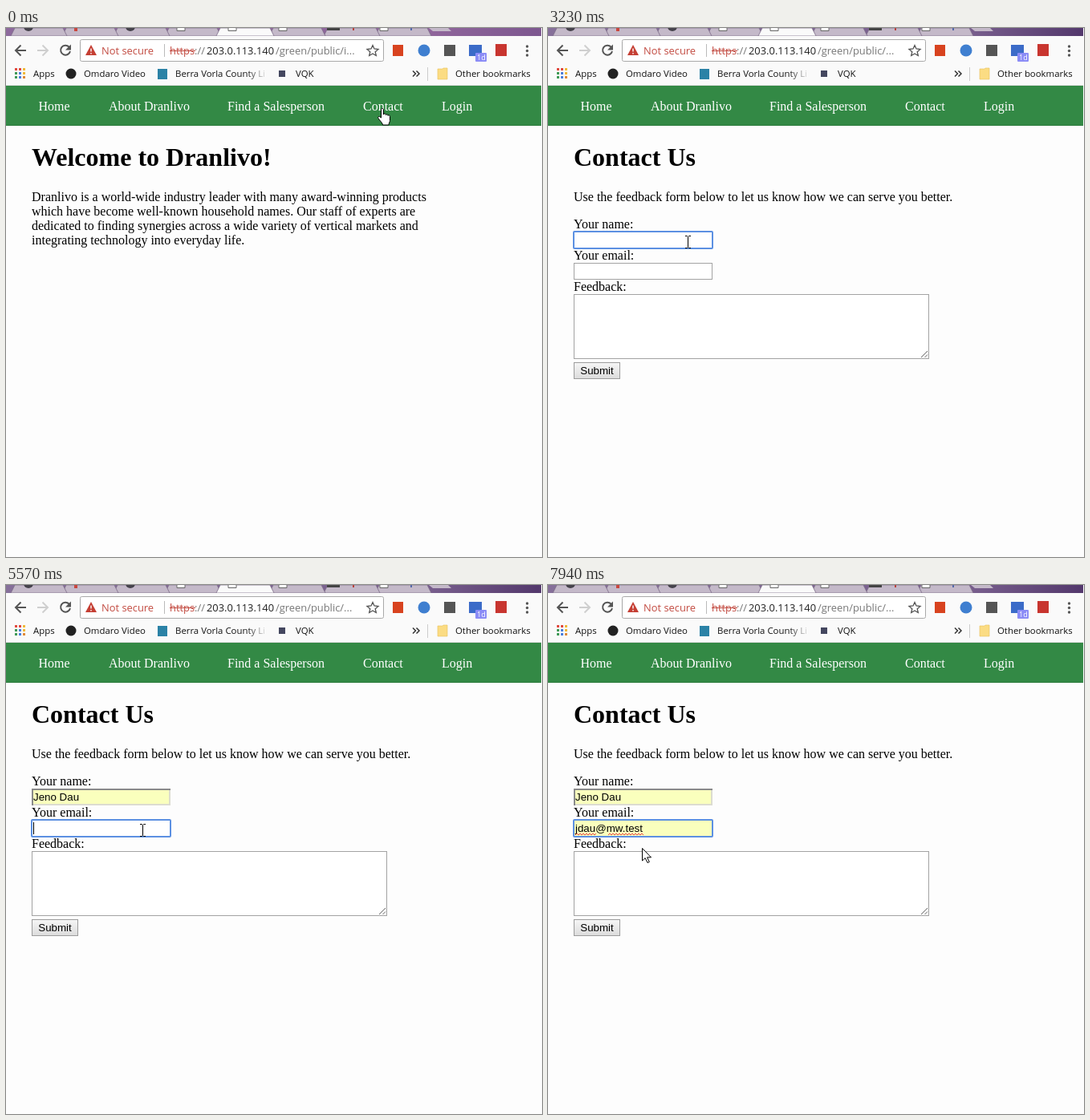
An HTML page for the animation above (8000 ms loop, 668 px wide and 660 px high).

```html
<!DOCTYPE html>
<html lang="en">
<head>
<meta charset="utf-8">
<title>Contact form</title>
<style>
html, body { margin: 0; width: 100%; height: 100%; overflow: hidden; background: #fdfdfd; }
svg { display: block; width: 100vw; height: 100vh; }
text { white-space: pre; }
.ui { font-family: "Open Sans", "Noto Sans", sans-serif; font-size: 11.4px; fill: #111; }
.url { font-size: 12.9px; fill: #777; }
.page { font-family: "Liberation Serif", "Times New Roman", serif; font-size: 16px; }
.h1 { font-size: 32px; font-weight: bold; }
.field { font-family: "Liberation Sans", Arial, sans-serif; font-size: 13.333px; }
.item { font-weight: bold; font-size: 11.5px; fill: #000; }
.line { fill: none; stroke: #555; stroke-width: 2; }
.box { fill: #fff; stroke: #a3a3a3; }
.focus { fill: none; stroke: #5c90e2; stroke-width: 2; }
.cursor { fill: #fff; stroke: #000; stroke-width: 1; }
</style>
</head>
<body>
<svg viewBox="0 0 668 660" preserveAspectRatio="none">
  <defs>
    <linearGradient id="theme"><stop stop-color="#8d6a9c"/><stop offset=".8" stop-color="#8f659b"/><stop offset="1" stop-color="#7d578f"/></linearGradient>
    <linearGradient id="themeDim"><stop stop-color="#86709a"/><stop offset=".8" stop-color="#775d8c"/><stop offset="1" stop-color="#53386c"/></linearGradient>
    <linearGradient id="fade" gradientUnits="userSpaceOnUse" x1="300" x2="326" y1="0" y2="0"><stop stop-color="#111"/><stop offset="1" stop-color="#111" stop-opacity="0"/></linearGradient>
    <linearGradient id="button" x2="0" y2="1"><stop stop-color="#f6f6f6"/><stop offset="1" stop-color="#dcdcdc"/></linearGradient>
  </defs>
  <rect width="668" height="660" fill="#fdfdfd"/>

  <g id="tabs">
    <rect width="667" height="10" fill="url(#theme)"/>
    <rect data-on="300-8000" width="667" height="10" fill="url(#themeDim)"/>
  </g>

  <g id="toolbar">
    <rect y="10" width="667" height="62" fill="#fafafa"/>
    <path d="M0 71.500H667" stroke="#ddd"/>
    <path class="line" d="M25 28H12M18.500 21.500L12 28L18.500 34.500"/>
    <path class="line" d="M39 28H52M45.500 21.500L52 28L45.500 34.500" style="stroke:#cfcfcf"/>
    <g data-on="0-540,1250-8000">
      <path class="line" d="M78.500 23.500A6 6 0 1 0 80 29"/><path d="M81 20.500V27.500H74Z" fill="#555"/>
    </g>
    <path class="line" data-on="540-1250" d="M68.500 22.500L79.500 33.500M79.500 22.500L68.500 33.500"/>
    <rect x="92.500" y="14.500" width="378" height="27" rx="2" fill="#fff" stroke="#a9a9a9"/>
    <path d="M106 21L113 34H99Z" fill="#c53f34"/><path d="M106 25.500V29.500M106 31V32.500" stroke="#fff" stroke-width="1.400"/>
    <text class="ui url" x="119" y="33" style="fill:#c24a40">Not secure</text>
    <path d="M197.500 20V36" stroke="#bbb"/>
    <text class="ui url" x="204" y="33"><tspan fill="#c24a40">https</tspan>://<tspan x="250" fill="#222">203.0.113.140</tspan><tspan x="336">/green/public/</tspan><tspan data-on="0-970">i</tspan>...</text>
    <path d="M204 28.500H236" stroke="#c24a40"/>
    <path d="M457 21.500L459 26L464 26.500L460.200 29.700L461.300 34.500L457 32L452.700 34.500L453.800 29.700L450 26.500L455 26Z" fill="none" stroke="#555" stroke-width="1.300"/>
    <rect x="482" y="21" width="13" height="14" fill="#d8431f"/>
    <circle cx="521" cy="28" r="7.500" fill="#3f7fd0"/>
    <rect x="546" y="21" width="14" height="14" fill="#555"/>
    <rect x="577" y="21" width="16" height="14" fill="#3b6bc8"/>
    <rect x="585" y="31" width="14" height="11" rx="1" fill="#8b8cf6"/>
    <text class="ui" x="587" y="40" style="font-size:9px;fill:#fff">1d</text>
    <rect x="610" y="20" width="14" height="15" fill="#c8352f"/>
    <g fill="#555"><circle cx="649.500" cy="23" r="1.700"/><circle cx="649.500" cy="28.500" r="1.700"/><circle cx="649.500" cy="34" r="1.700"/></g>

    <g id="apps"></g>
    <text class="ui" x="34" y="61">Apps</text>
    <circle cx="81" cy="57" r="6.500" fill="#222"/>
    <text class="ui" x="97" y="61">Omdaro Video</text>
    <rect x="189" y="51" width="12" height="13" fill="#2b82a6"/>
    <text class="ui" x="211" y="61" style="fill:url(#fade)">Berra Vorla County Li</text>
    <rect x="340" y="53" width="8" height="8" fill="#44475f"/>
    <text class="ui" x="361" y="61">VQK</text>
    <path d="M507 53.500L510.500 57L507 60.500M511.500 53.500L515 57L511.500 60.500" fill="none" stroke="#333" stroke-width="1.500"/>
    <path d="M525.500 49V66" stroke="#ccc"/>
    <path d="M538 51H544L545 50H550V64H538Z" fill="#fbdc83" stroke="#e8c25d" stroke-width=".6"/>
    <text class="ui" x="560" y="61">Other bookmarks</text>
  </g>

  <g class="page" fill="#fff">
    <rect y="72" width="667" height="50" fill="#338945"/>
    <path d="M0 121.500H667" stroke="#2e7c3e"/>
    <text x="40.500" y="103">Home</text>
    <text x="128" y="103">About Dranlivo</text>
    <text x="276" y="103">Find a Salesperson</text>
    <text x="445" y="103">Contact</text>
    <text x="543" y="103">Login</text>
  </g>

  <g class="page" data-on="0-1250">
    <text class="h1" x="32" y="172">Welcome to Dranlivo!</text>
    <text x="32" y="216">Dranlivo is a world-wide industry leader with many award-winning products</text>
    <text x="32" y="234">which have become well-known household names. Our staff of experts are</text>
    <text x="32" y="252">dedicated to finding synergies across a wide variety of vertical markets and</text>
    <text x="32" y="270">integrating technology into everyday life.</text>
  </g>

  <g data-on="1250-8000">
    <g class="page">
      <text class="h1" x="32" y="172">Contact Us</text>
      <text x="32" y="216">Use the feedback form below to let us know how we can serve you better.</text>
      <text x="32" y="250">Your name:</text>
      <text x="32" y="289">Your email:</text>
      <text x="32" y="328">Feedback:</text>
    </g>
    <rect class="box" x="32.500" y="254.500" width="172" height="20"/>
    <rect class="box" x="32.500" y="293.500" width="172" height="20"/>
    <rect class="box" x="32.500" y="332.500" width="442" height="80"/>
    <path d="M465 411L473 403M469.500 411L473 407.500" stroke="#666"/>
    <rect x="32.500" y="417.500" width="57" height="20" fill="url(#button)" stroke="#9c9c9c"/>
    <text class="field" x="61" y="432" text-anchor="middle">Submit</text>

    <g data-on="4630-8000">
      <rect x="32" y="254" width="173" height="21" fill="#faffbd"/>
      <g data-on="5570-8000" fill="none" stroke-width="2">
        <path d="M204 255V274H33" stroke="#dcdcd0"/><path d="M33 275V255H205" stroke="#8a8a8a"/>
      </g>
    </g>
    <rect data-on="7090-8000" x="32" y="293" width="173" height="21" fill="#faffbd"/>
    <rect class="focus" data-on="2680-5570" x="32" y="254" width="173" height="21" rx="1"/>
    <rect class="focus" data-on="5570-8000" x="32" y="293" width="173" height="21" rx="1"/>

    <g class="field">
      <text data-on="3640-4630" x="34" y="269">J</text>
      <text data-on="4630-8000" x="34" y="269">Jeno Dau</text>
      <text data-on="6230-7090" x="34" y="308">j</text>
      <text data-on="7090-8000" x="34" y="308">jdau@mw.test</text>
    </g>
    <path id="squiggle" data-on="7510-8000" fill="none" stroke="#e2483d"/>
    <g stroke="#000">
      <path data-on="2680-3230" d="M34.500 257V272"/>
      <path data-on="3640-4170" d="M41.500 257V272"/>
      <path data-on="5030-5570" d="M91.500 257V272"/>
      <path data-on="5570-5980" d="M34.500 296V311"/>
      <path data-on="6230-6660" d="M37.500 296V311"/>
      <path data-on="7360-7940" d="M119.500 296V311"/>
    </g>

    <g data-on="3640-5030">
      <rect x="32.500" y="275.500" width="174" height="25" fill="#fff" stroke="#c9c9c9"/>
      <rect data-on="4630-5030" x="33" y="276" width="173" height="24" fill="#e4e4e4"/>
      <text class="ui item" x="41" y="292">Jeno Dau</text>
    </g>
    <g data-on="6230-7360">
      <rect x="32.500" y="314.500" width="183" height="121" fill="#fff" stroke="#c9c9c9"/>
      <rect data-on="7090-7360" x="33" y="315" width="182" height="24" fill="#e4e4e4"/>
      <g id="emails"></g>
    </g>
  </g>

  <g id="cursor">
    <path id="arrow" class="cursor" d="M.5 .5V16L4.200 12.600L7 18.500L9.300 17.500L6.600 11.800H11.500Z"/>
    <path id="hand" class="cursor" d="M-.500 12V2C-.500 0 2.500 0 2.500 2V8C2.500 6.500 5.500 6.500 5.500 8.500C5.500 7.300 8 7.500 8 9.300C8 8.300 10.500 8.500 10.500 10.300V15.500C10.500 17.500 9 18.500 9 21H1.500C1.500 18.500-2 16-4.100 12.500C-5.100 11.500-3.100 9.500-1.900 10.900Z"/>
    <path id="beam" d="M-3.500-7.500H-1L0-6.500L1-7.500H3.500M0-6.500V6.500M-3.500 7.500H-1L0 6.500L1 7.500H3.500" fill="none" stroke="#000"/>
  </g>
</svg>
<script>
const LOOP = 8000;
const $ = id => document.getElementById(id);

// Tab strip
const tab = (x, w, fill) =>
  `<path d="M${x} 10L${x + 5} 0H${x + w - 5}L${x + w} 10Z" fill="${fill}" stroke="#7d6c88" stroke-width=".8"/>`;
const pageIcon = (x, on = "") =>
  `<path ${on} d="M${x - 5} 0V3.500H${x + 5}V0" fill="#fff" stroke="#666"/>`;
let strip = "";
for (const x of [460, 396, 328, 198, 134, 70, 6]) strip += tab(x, 70, "#c4b9c9");
strip += tab(262, 72, "#fafafa");
strip += '<path d="M527 0H551L555 4H532Z" fill="#c4b9c9"/>';
strip += [28, 155].map(x => `<circle cx="${x}" cy="-2" r="6" fill="#46434c"/>`).join("");
strip += [218, 345, 471].map(x => pageIcon(x)).join("");
strip += pageIcon(282, 'data-on="0-540,1250-8000"');
strip += '<rect x="85" y="0" width="4" height="4" fill="#c9473f"/><rect x="400" y="0" width="16" height="3" fill="#444"/>';
strip += '<rect x="432" y="0" width="2" height="3" fill="#b8433d"/><rect x="504" y="0" width="2" height="3" fill="#5468a8"/>';
strip += '<circle data-on="540-1250" id="spinner" cx="282" cy="-1.500" r="5.500" fill="none" stroke="#4c86dd" stroke-width="2.200" stroke-dasharray="26 9"/>';
$("tabs").insertAdjacentHTML("beforeend", strip);

const dots = ["#e0493e", "#e0493e", "#f0b93a", "#3f9a57", "#4a7fdc", "#f0b93a", "#3f9a57", "#4a7fdc", "#e08a3a"];
$("apps").innerHTML = dots.map((c, i) =>
  `<rect x="${11 + i % 3 * 5}" y="${50 + Math.floor(i / 3) * 5}" width="3" height="3" fill="${c}"/>`).join("");

const emails = ["jdau@mw.test", "jd@mw.test", "jdau@mv.test' AND 1=1 --'",
  "jdau@mw.test ' AND 1=1 --'", "jmarvol52@salesagent.test"];
$("emails").innerHTML = emails.map((e, i) =>
  `<text class="ui item" x="41" y="${331 + i * 24}">${e}</text>`).join("");

const wave = (from, to) => {
  let d = `M${from} 312`;
  for (let x = from + 2, up = true; x <= to; x += 2, up = !up) d += `L${x} ${up ? 310 : 312}`;
  return d;
};
$("squiggle").setAttribute("d", wave(34, 60) + wave(75, 119));

// Pointer holds each place until the next time: [ms, x, y, shape]
const moves = [
  [0, 468, 100, "hand"], [540, 467, 100, "arrow"], [2020, 449, 158, "arrow"],
  [2170, 330, 205, "arrow"], [2290, 271, 233, "arrow"], [2410, 212, 253, "arrow"],
  [2530, 174, 267, "beam"], [4630, 164, 283, "arrow"], [4750, 162, 288, "arrow"],
  [5180, 162, 294, "arrow"], [5300, 170, 306, "beam"], [6810, 156, 301, "arrow"],
  [6940, 145, 301, "arrow"], [7090, 141, 316, "arrow"], [7210, 140, 320, "arrow"],
  [7940, 117, 328, "arrow"]
];

const timed = [...document.querySelectorAll("[data-on]")].map(el => ({
  el, spans: el.dataset.on.split(",").map(s => s.split("-").map(Number))
}));

function draw(t) {
  for (const { el, spans } of timed)
    el.style.display = spans.some(([a, b]) => t >= a && t < b) ? "" : "none";
  const [, x, y, shape] = moves.filter(m => m[0] <= t).pop();
  const dx = shape === "beam" ? 0.5 : 0;
  $("cursor").setAttribute("transform", `translate(${x + dx} ${y})`);
  for (const id of ["arrow", "hand", "beam"]) $(id).style.display = id === shape ? "" : "none";
  $("spinner").setAttribute("transform", `rotate(${t * 0.36 % 360} 282 -1.5)`);
}

const start = performance.now();
function tick() {
  draw((performance.now() - start) % LOOP);
  requestAnimationFrame(tick);
}
tick();
</script>
</body>
</html>
```
